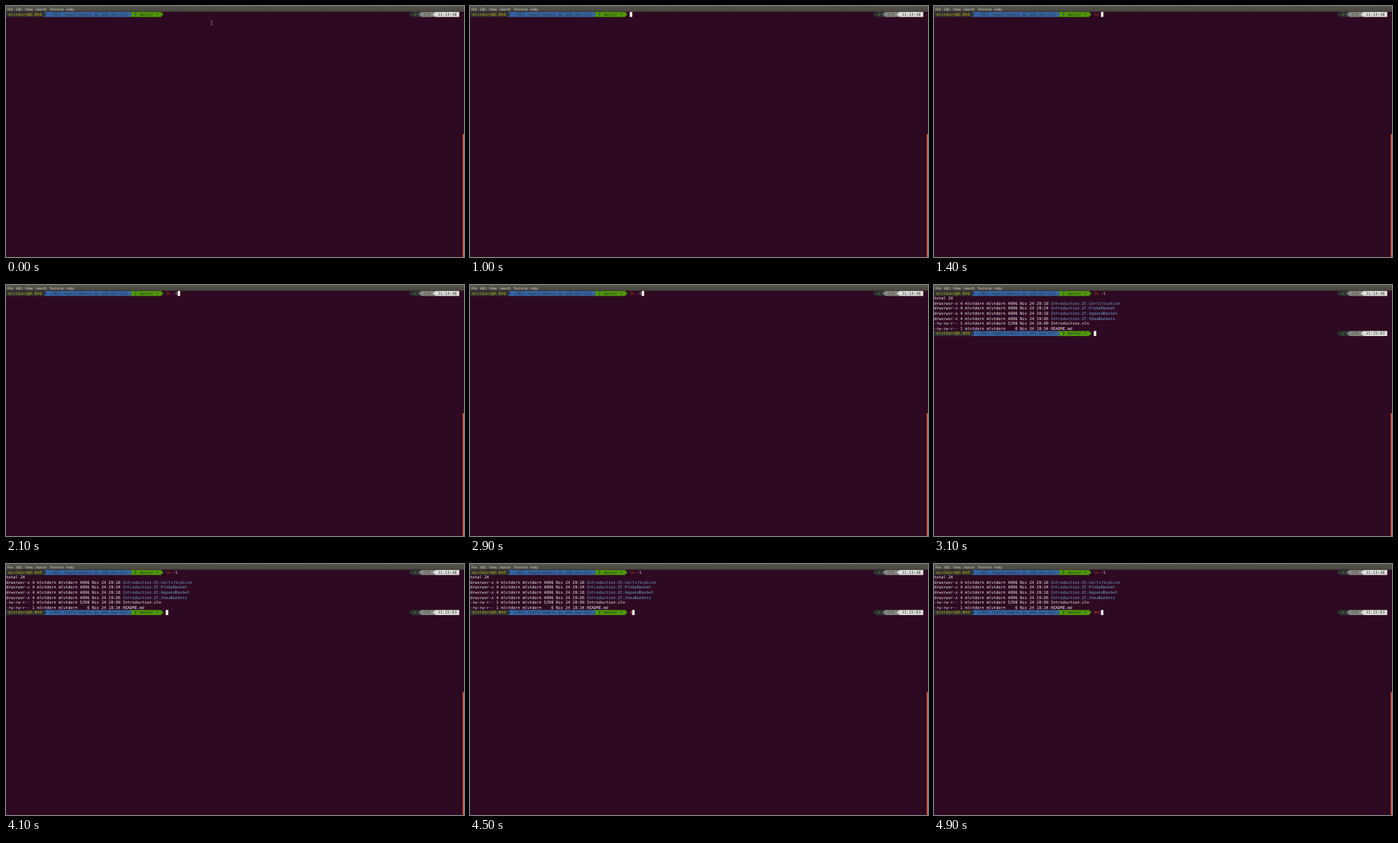
These frames come from a looping animation (600x329 px, 5 s). An HTML page:

```html
<!DOCTYPE html>
<html lang="en">
<head>
<meta charset="utf-8">
<title>Terminal session</title>
<style>
  html, body { margin: 0; width: 100%; height: 100%; overflow: hidden; background: #2d0a22; }
  svg { display: block; width: 100%; height: 100%; }
  text { white-space: pre; text-rendering: geometricPrecision; }
  .mono { font: 5.19px "DejaVu Sans Mono", monospace; }
  .menu { font: 4.6px "Open Sans", "Noto Sans", sans-serif; fill: #e4e0d8; }
</style>
</head>
<body>
<svg id="stage" viewBox="0 0 600 329" preserveAspectRatio="none">
  <defs>
    <linearGradient id="bar" x2="0" y2="1">
      <stop offset="0" stop-color="#55534b"/>
      <stop offset="1" stop-color="#47463f"/>
    </linearGradient>
  </defs>
</svg>
<script>
const LOOP = 5000, CW = 3.125, RH = 6.5625, TOP = 7.8;
const INK = '#2e3436', BLUE = '#3465a4', GREEN = '#4e9a06', GRAY = '#85877f',
      PALE = '#e3e5df', WHITE = '#f3eff1', DIR = '#729fcf', RED = '#d4452f', YELLOW = '#c4a000';
const USER = 'mlvtdorn', HOST = 'K-B40', PATH = '~/052.repos/sample.qx_web.box-kit';

const stage = document.getElementById('stage');
const col = c => c * CW;
const row = r => TOP + r * RH;

function add(parent, tag, attrs, content) {
  const el = document.createElementNS('http://www.w3.org/2000/svg', tag);
  for (const k in attrs) el.setAttribute(k, attrs[k]);
  if (content) el.textContent = content;
  parent.appendChild(el);
  return el;
}
const group = () => add(stage, 'g', {});
const rect = (p, x, y, width, height, fill) => add(p, 'rect', { x, y, width, height, fill });
const show = (el, on) => el.setAttribute('visibility', on ? 'visible' : 'hidden');

function print(p, c, r, str, fill, weight = 400) {
  return add(p, 'text', { class: 'mono', x: col(c), y: row(r) + 4.95, fill, 'font-weight': weight }, str);
}
function block(p, from, to, r, fill) {
  rect(p, col(from), row(r), col(to - from), RH, fill);
}
// Triangular separator filling one cell; dir is 1 for right, -1 for left
function tip(p, c, r, dir, fill) {
  const base = col(dir > 0 ? c : c + 1), y = row(r);
  add(p, 'path', { d: `M${base} ${y}l${dir * CW} ${RH / 2}L${base} ${y + RH}z`, fill });
}

function prompt(p, r, count, clock) {
  const y = row(r);
  block(p, 0, 16, r, INK);
  block(p, 16, 52, r, BLUE);
  block(p, 52, 65, r, GREEN);
  tip(p, 16, r, 1, INK);
  tip(p, 52, r, 1, BLUE);
  tip(p, 65, r, 1, GREEN);
  print(p, 1, r, USER + '@' + HOST, YELLOW);
  print(p, 18, r, PATH, INK);
  add(p, 'path', {
    d: `M${col(54) + .7} ${y + 1}v4.7M${col(54) + .7} ${y + 4.2}q1.6-.3 1.6-2.5`,
    fill: 'none', stroke: INK, 'stroke-width': .6
  });
  print(p, 56, r, 'master ?', INK);

  block(p, 170, 174, r, INK);
  block(p, 174, 180, r, GRAY);
  block(p, 180, 190, r, PALE);
  tip(p, 169, r, -1, INK);
  tip(p, 173, r, -1, GRAY);
  tip(p, 179, r, -1, PALE);
  add(p, 'path', {
    d: `M${col(171) + .3} ${y + 3.6}l.9 1.1 1.6-3`,
    fill: 'none', stroke: GREEN, 'stroke-width': .7
  });
  print(p, 175, r, count, '#50544f');
  print(p, 181, r, clock, INK);
}

function listing(p) {
  const files = [
    [4, 4096, '20:18', 'Introduction.Q7.Certification'],
    [4, 4096, '19:24', 'Introduction.Q7.ProbeBasket'],
    [4, 4096, '20:18', 'Introduction.Q7.AppendBasket'],
    [4, 4096, '19:05', 'Introduction.Q7.ShowBaskets'],
    [1, 5298, '20:09', 'Introduction.sln'],
    [1, 0, '18:34', 'README.md']
  ];
  print(p, 0, 1, 'total 24', WHITE);
  files.forEach(([links, size, time, name], i) => {
    const dir = links > 1, mode = dir ? 'drwxrwxr-x' : '-rw-rw-r--';
    print(p, 0, i + 2, `${mode} ${links} ${USER} ${USER} ${String(size).padStart(4)} Nis 24 ${time}`, WHITE);
    print(p, 49, i + 2, name, dir ? DIR : WHITE, dir ? 700 : 400);
  });
}

// Window
rect(stage, 0, 0, 600, 329, '#2d0a22');
rect(stage, 0, 0, 600, 7.5, 'url(#bar)');
[['File', 1.7], ['Edit', 13], ['View', 25], ['Search', 39], ['Terminal', 57], ['Help', 79]]
  .forEach(([label, x]) => add(stage, 'text', { class: 'menu', x, y: 5.5 }, label));
rect(stage, 598.4, 168, 1.6, 161, '#dc6044');

// Session
prompt(group(), 0, '275', '21:14:48');
const output = group();
listing(output);
const second = group();
prompt(second, 8, '276', '21:15:03');

const cmd = print(stage, 67, 0, '', RED);
const opt = print(stage, 70, 0, '', WHITE);
const next = print(stage, 67, 8, '', RED);
const caret = rect(stage, 0, 0, CW, RH, '#ffffff');
const mouse = add(stage, 'path', {
  d: 'M268.1 19.7h.8l.4.4.4-.4h.8M269.3 20v4.4M268.1 24.7h.8l.4-.4.4.4h.8',
  fill: 'none', stroke: '#b9aeb5', 'stroke-width': .55
});

const typed = (str, times, t) => str.slice(0, times.filter(k => t >= k).length);
const within = (t, a, b) => t >= a && t < b;

function render(t) {
  const line = typed('ls -l', [1100, 1200, 1400, 1700, 2100], t);
  const word = typed('dot', [4500, 4700, 4900], t);
  cmd.textContent = line.slice(0, 2);
  opt.textContent = line.slice(3);
  next.textContent = word;
  next.setAttribute('fill', word === 'do' ? YELLOW : RED);

  show(mouse, t < 1000);
  show(output, t >= 3000);
  show(second, t >= 3100);

  const c = t < 3000 ? 67 + line.length : t < 3100 ? 0 : 67 + word.length;
  caret.setAttribute('x', col(c));
  caret.setAttribute('y', row(t < 3000 ? 0 : 8));
  show(caret, !(t < 500 || within(t, 2600, 2900) || within(t, 3500, 4100)));
}

const start = performance.now();
function tick() {
  render((performance.now() - start) % LOOP);
  requestAnimationFrame(tick);
}
render(0);
requestAnimationFrame(tick);
</script>
</body>
</html>
```
